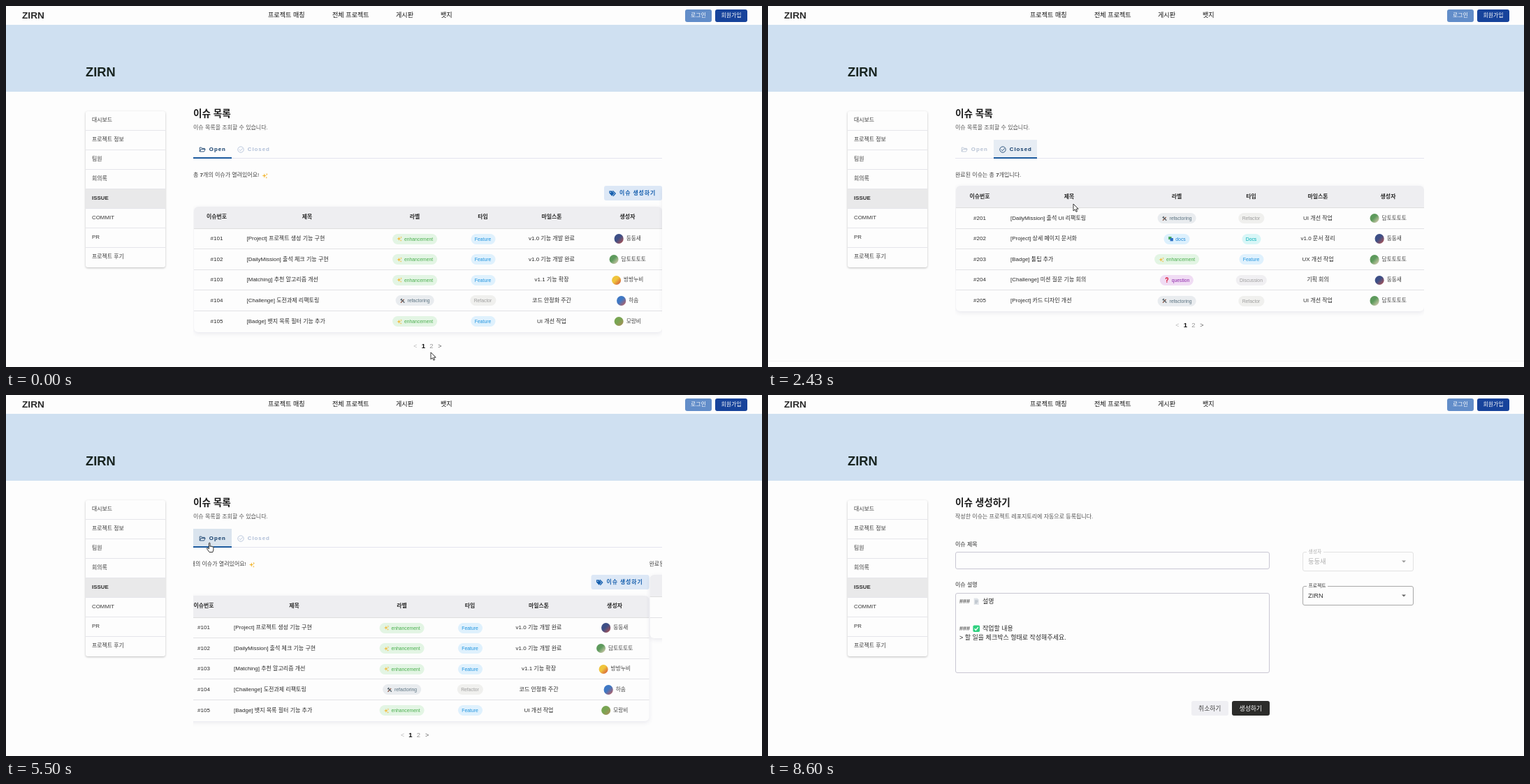
An HTML page that plays this animation: 1082x518 px, repeating every 8.63 s.

```html
<!DOCTYPE html>
<html lang="ko">
<head>
<meta charset="utf-8">
<title>이슈 목록</title>
<style>
html, body { margin: 0; width: 100%; height: 100%; overflow: hidden; background: #fdfdfd; }
body { position: relative; color: #2b2b2b; font: 8px 'Liberation Sans', 'Noto Sans CJK KR', 'Noto Sans CJK', sans-serif; }
div, span.t { position: absolute; box-sizing: border-box; }
.layer { inset: 0; }
.t { line-height: 20px; margin-top: -10px; white-space: pre; }
.c { transform: translateX(-50%); }
.row { display: flex; align-items: center; }
svg { display: block; flex: none; overflow: visible; }
b { font-weight: 700; }
.pill { height: 15px; border-radius: 8px; padding: 0 5.8px; gap: 3px; font-size: 6.8px; line-height: 15px; margin-top: -7.5px; }
.face { position: static; width: 13.5px; height: 13.5px; border-radius: 50%; margin-right: 4px; flex: none; }
#views { clip-path: inset(0 143px 0 268px); }
</style>
</head>
<body>
<script>
const LOOP = 8630, WIDTH = 671;
const APP = 'ZIRN', ME = '둥둥새';

// ---- markup helpers ----
const text = (x, y, s, css = '', cls = '') =>
  `<span class="t ${cls}" style="left:${x}px;top:${y}px;${css}">${s}</span>`;
const mid = (x, y, s, css) => text(x, y, s, css, 'c');
const box = (x, y, w, h, css = '', inner = '') =>
  `<div style="left:${x}px;top:${y}px;width:${w}px;height:${h}px;${css}">${inner}</div>`;
const layer = (id, inner) => `<div class="layer" id="${id}">${inner}</div>`;
const svg = (size, inner, attrs = '') =>
  `<svg width="${size}" height="${size}" viewBox="0 0 24 24" ${attrs}>${inner}</svg>`;
const at = (x, y, inner) => `<div style="left:${x}px;top:${y}px">${inner}</div>`;
const path = (d, fill) => `<path d="${d}" fill="${fill}"/>`;
const line = (d, color, w = 2) => `<path d="${d}" fill="none" stroke="${color}" stroke-width="${w}"/>`;

const ICON = {
  spark: path('M10 3l2 7 7 2-7 2-2 7-2-7-7-2 7-2z', '#f2b632') + path('M19 1l1 4 4 1-4 1-1 4-1-4-4-1 4-1zM18 16l1 2 3 1-3 1-1 3-1-3-3-1 3-1z', '#f2b632'),
  tools: line('M4 20L18 6', '#8a5a4a', 4) + line('M5 5l15 15M3 9l6-6', '#59656d', 4),
  bug: line('M4 7q5-3 7 4t9 6', '#4f9f45', 8) + line('M6 12l-2 5M13 18l-3 4M17 9l3-4', '#4f9f45'),
  docs: path('M2 3h13v12H2z', '#43a85a') + path('M9 9h13v13H9z', '#2b6fc4'),
  ask: line('M7 8q0-5 5-5t5 5q0 3-5 6v3M12 19v4', '#dc2440', 4),
  page: path('M4 1h11l5 5v17H4z', '#dfe3e8') + line('M7 9h10M7 13h10M7 17h7', '#9aa4ae', 1.6),
  done: '<rect x="1" y="1" width="22" height="22" rx="4" fill="#2fd07f"/>' + line('M6 12l4 5 8-10', '#fff', 3),
  folder: line('M3 19V5h6l2 3h9v3M3 19l4-8h15l-4 8z', 'currentColor'),
  check: '<circle cx="12" cy="12" r="10" fill="none" stroke="currentColor" stroke-width="2"/>' + line('M7 12l4 4 7-8', 'currentColor'),
  tag: path('M1 3h9l8 9-8 9-9-10z', '#155fae') + line('M13 3l9 9-8 9', '#155fae', 3) + '<circle cx="5.500" cy="7.500" r="1.800" fill="#dde8f6"/>',
  pin: path('M12 2C8 2 5 5 5 9c0 5 7 13 7 13s7-8 7-13c0-4-3-7-7-7z', '#8b9bb0') + '<circle cx="12" cy="9" r="2.500" fill="#fdfdfd"/>',
  phone: path('M4 3h5l1 5-3 3q2 4 6 6l3-3 5 1v5q0 1-1 1C10 21 3 14 3 4q0-1 1-1z', '#8b9bb0'),
  mail: path('M2 4h20v16H2z', '#8b9bb0') + line('M3 7l9 6 9-6', '#fdfdfd')
};

// ---- table data ----
const LABEL = {
  enhancement: ['spark', '#e3f5e4', '#4caf50'],
  refactoring: ['tools', '#e9ecef', '#5b7280'],
  bug: ['bug', '#f2d8e1', '#b0194a'],
  docs: ['docs', '#dcf0fd', '#1c87d6'],
  question: ['ask', '#f0dcf4', '#8e24aa']
};
const TYPE = {
  Feature: ['#dff1fd', '#2094df'], Refactor: ['#f0f0ee', '#9e9e9e'], Bug: ['#fbe3e3', '#e53935'],
  Docs: ['#d8f6f7', '#00adb5'], Discussion: ['#f0eff2', '#9e9e9e']
};
const FACE = {
  [ME]: ['#3d4f86', '#c0544c'], 담토토토토: ['#5d9a5c', '#e8d3bd'], 방방누비: ['#f0c53c', '#d0483c'],
  하솜: ['#3f78c4', '#cf5a50'], 모랑비: ['#78a552', '#b08a5a'], Dewfern: ['#ecc04a', '#a8623c']
};
const SUKI = '담토토토토';

const pill = (x, y, [bg, fg], inner) =>
  `<div class="pill row c" style="left:${x}px;top:${y}px;background:${bg};color:${fg}">${inner}</div>`;

function cells([id, title, label, type, goal, user], y, [cId, , xTitle, cLabel, cType, cGoal, cUser]) {
  const [icon, ...tone] = LABEL[label], [a, b] = FACE[user];
  return mid(cId, y, id) + text(xTitle, y, title) +
    pill(cLabel, y, tone, svg(8, ICON[icon]) + label) + pill(cType, y, TYPE[type], type) + mid(cGoal, y, goal) +
    `<span class="t c row" style="left:${cUser}px;top:${y}px;font-size:7.7px;color:#444"><div class="face" style="background:linear-gradient(135deg,${a} 45%,${b})"></div>${user}</span>`;
}

function issuePage(id, top, cols, current, rows) {
  const head = ['이슈번호', '제목', '', '라벨', '타입', '마일스톤', '생성자'];
  const rowY = i => top + 32 + 29.6 * i, end = rowY(rows.length);
  const num = n => mid(n === 1 ? 597.5 : 609, end + 20, n,
    `font-size:9.5px;${n === current ? 'font-weight:700;color:#111' : 'color:#999'}`);
  const arrow = (x, s, on) => mid(x, end + 20, s, `font-size:9px;color:${on ? '#666' : '#bbb'}`);
  return layer(id,
    box(268.5, top, 670.5, end - top, 'border-radius:6px;box-shadow:0 2px 6px rgba(60,60,110,.11);background:#fdfdfd') +
    box(268.5, top, 670.5, 32, 'border-radius:6px 6px 0 0;background:#eeeef1;border-bottom:1px solid #dedede') +
    head.map((s, i) => mid(cols[i], top + 15.5, s, 'font-weight:700;font-size:7.9px')).join('') +
    rows.map((r, i) => (i ? box(268.5, rowY(i) - 1, 670.5, 1, 'background:#e2e2e5') : '') + cells(r, rowY(i) + 14.6, cols)).join('') +
    arrow(586, '&lt;', current === 2) + num(1) + num(2) + arrow(621, '&gt;', current === 1));
}

const openPane = layer('open',
  text(268, 243, '총 <b>7</b>개의 이슈가 열려있어요!', 'color:#444') + at(365.5, 238.5, svg(9, ICON.spark)) +
  box(855.5, 258, 83.5, 20.5, 'background:#dde8f6;border-radius:3px') + at(863, 263.5, svg(10, ICON.tag)) +
  text(878, 268.5, '이슈 생성하기', 'font-weight:700;color:#155fae;letter-spacing:.9px;font-size:7.9px') +
  issuePage('o1', 287.5, [301.5, 431, 344.5, 585, 682.5, 781, 889.5], 1, [
    ['#101', '[Project] 프로젝트 생성 기능 구현', 'enhancement', 'Feature', 'v1.0 기능 개발 완료', ME],
    ['#102', '[DailyMission] 출석 체크 기능 구현', 'enhancement', 'Feature', 'v1.0 기능 개발 완료', SUKI],
    ['#103', '[Matching] 추천 알고리즘 개선', 'enhancement', 'Feature', 'v1.1 기능 확장', '방방누비'],
    ['#104', '[Challenge] 도전과제 리팩토링', 'refactoring', 'Refactor', '코드 안정화 주간', '하솜'],
    ['#105', '[Badge] 뱃지 목록 필터 기능 추가', 'enhancement', 'Feature', 'UI 개선 작업', '모랑비']]) +
  issuePage('o2', 287.5, [301, 448, 343.5, 619.5, 713.5, 802, 896], 2, [
    ['#106', '[Project] 삭제 기능 오류 수정', 'bug', 'Bug', '긴급 패치 v1.0.1', 'Dewfern'],
    ['#107', '[Matching] 사용자 매칭 결과 저장 기능 구현', 'enhancement', 'Feature', 'v1.1 기능 확장', ME]]));

const closedTwin = ['#206', '[Matching] 매칭 로직 구조 분리', 'refactoring', 'Refactor', '코드 안정화 주간', ME];
const closedPane = layer('closed',
  text(268, 243, '완료된 이슈는 총 <b>7</b>개입니다.', 'color:#444') +
  issuePage('c1', 258, [303, 431, 347, 585, 691.5, 787, 887.5], 1, [
    ['#201', '[DailyMission] 출석 UI 리팩토링', 'refactoring', 'Refactor', 'UI 개선 작업', SUKI],
    ['#202', '[Project] 상세 페이지 문서화', 'docs', 'Docs', 'v1.0 문서 정리', ME],
    ['#203', '[Badge] 툴팁 추가', 'enhancement', 'Feature', 'UX 개선 작업', SUKI],
    ['#204', '[Challenge] 미션 질문 기능 회의', 'question', 'Discussion', '기획 회의', ME],
    ['#205', '[Project] 카드 디자인 개선', 'refactoring', 'Refactor', 'UI 개선 작업', SUKI]]) +
  issuePage('c2', 258, [305.5, 438.5, 351.5, 592, 692, 793.5, 895], 2, [closedTwin, closedTwin]));

// ---- page frame ----
const heading = (title, sub) => text(268, 154.5, title, 'font-size:13.6px;font-weight:700;color:#1c1c1c') +
  text(268, 174.5, sub, 'color:#555');
const button = (x, y, w, h, s, bg, fg, size) =>
  box(x, y, w, h, `background:${bg};border-radius:3px`) + mid(x + w / 2, y + h / 2, s, `color:${fg};font-size:${size}px;font-weight:500`);

const menu = ['대시보드', '프로젝트 정보', '팀원', '회의록', 'ISSUE', 'COMMIT', 'PR', '프로젝트 후기'];
const frame =
  box(0, 27, 1082, 95.5, 'background:#cfe0f1') +
  text(23, 13.5, APP, 'font-size:13.7px;font-weight:700') +
  text(114, 95, APP, 'font-size:18.3px;font-weight:700;color:#182420') +
  [[375, '프로젝트 매칭'], [467, '전체 프로젝트'], [558, '게시판'], [622, '뱃지']]
    .map(([x, s]) => text(x, 13, s, 'font-size:9.1px;color:#111;font-weight:500')).join('') +
  button(972, 4.5, 38, 18, '로그인', '#628dc9', '#fff;font-weight:700', 7.9) +
  button(1015, 4.5, 46, 18, '회원가입', '#17439b', '#fff;font-weight:700', 7.9) +
  box(113.5, 150.5, 114, 224, 'border-radius:3px;box-shadow:0 1px 3px rgba(0,0,0,.25);background:#fdfdfd') +
  menu.map((s, i) => box(113.5, 150.5 + 28 * i, 114, 28,
      `border-bottom:${i < 7 ? 1 : 0}px solid #e5e5ea;${s === 'ISSUE' ? 'background:#e9e9ea' : ''}`) +
    text(123, 164.2 + 28 * i, s, `font-size:7.9px;${s === 'ISSUE' ? 'font-weight:700' : 'color:#3a3a3a'}`)).join('');

const tab = (id, x, w, icon, s) => box(x, 192, w, 26.5, 'overflow:hidden',
    `<div id="${id}Wave" style="border-radius:50%;background:#15569c"></div>`) +
  `<div id="${id}Tab" class="layer">` + at(x + 7.5, 200.5, svg(10, ICON[icon])) +
  text(x + 22.8, 205.5, s, 'font-weight:700;font-size:7.9px;letter-spacing:.95px') + '</div>';

const list = layer('list', heading('이슈 목록', '이슈 목록을 조회할 수 있습니다.') +
  box(268, 218, WIDTH, 1, 'background:#e4e4ef') +
  tab('open', 268, 55, 'folder', 'Open') + tab('closed', 323, 62, 'check', 'Closed') +
  '<div id="bar" style="top:217.3px;height:1.300px;background:#1c5a9e"></div>' +
  layer('views', openPane + closedPane));

const links = [
  [38, '프로젝트 매칭', '#a9c8e4', '랜덤 매칭', '사설 매칭', '방 생성'],
  [293.5, '전체 프로젝트', '#75a0cd', '전체 프로젝트'],
  [464, '게시판', '#75a0cd', '자유게시판', 'Q&amp;A 게시판', '모집게시판'],
  [719, '뱃지', '#a9c8e4', '전체', '도전과제', '현업'],
  [889, 'Contacts', '#7d9cc0', '24, Narubit-ro, Solgaram-gu, Haeon', '+82 10 0000 0000', 'hellofield00@example.com']];
const footer = layer('footer', box(0, 0, 1082, 1, 'background:#f1f1f3') +
  links.map(([x, title, color, ...items], i) =>
    text(x, 34.5, title, 'font-size:10.2px;font-weight:700;color:#6f9fd0') +
    items.map((s, k) => (i === 4 ? at(x, 54 + 17 * k, svg(8, ICON[['pin', 'phone', 'mail'][k]])) : '') +
      text(i === 4 ? 903 : x, 58.5 + 17 * k, s, `color:${color}`)).join('')).join(''));

const select = (y, label, value, tone, edge) =>
  box(764.5, y, 159.5, 27.5, `border:1px solid ${edge};border-radius:3px`) +
  text(771, y, label, `font-size:6.8px;line-height:8px;margin-top:-4px;padding:0 2.500px;background:#fdfdfd;color:${tone}`) +
  text(773, y + 13.5, value, `font-size:9.3px;color:${tone}`) +
  at(904, y + 8, svg(12, path('M6 9l6 6 6-6z', tone === '#333' ? '#666' : '#999')));
const field = (y, h) => box(268, y, 450, h, 'border:1px solid #c9c7d3;border-radius:3px');
const form = layer('form', heading('이슈 생성하기', '작성한 이슈는 프로젝트 레포지토리에 자동으로 등록됩니다.') +
  text(268, 214.5, '이슈 제목') + field(225, 25) + text(268, 273, '이슈 설명') + field(284, 114.5) +
  [[296, '###'], [335, '###'], [348, '&gt; 할 일을 체크박스 형태로 작성해주세요.']]
    .map(([y, s]) => text(274, y, s, 'font-size:9px')).join('') +
  at(293, 290.500, svg(10.5, ICON.page)) + text(307, 296, '설명', 'font-size:9px') +
  at(293, 329.800, svg(10.5, ICON.done)) + text(307, 335, '작업할 내용', 'font-size:9px') +
  button(605.5, 439, 53.5, 21, '취소하기', '#efeff3', '#444', 8.8) +
  button(663.5, 439, 54.5, 21, '생성하기', '#2c2c2a', '#fff', 8.8) +
  select(225, '생성자', ME, '#b0b0b0', '#e2e2e2') + select(274, '프로젝트', APP, '#333', '#a8a8a8'));

const cursor = `<div id="mouse" style="left:0;top:0"><svg width="1" height="1" fill="#fff" stroke="#222" stroke-width=".9" stroke-linejoin="round">
  <path id="arrow" d="M0 0V10L2.400 7.800 4 11.300 5.600 10.600 4.100 7.200H7.200z"/>
  <path id="hand" transform="translate(-4 -.5)" d="M4 14L.8 9.500c-1-1.500.6-2.200 1.500-1.100L3.400 9.500V1.600c0-1.500 1.700-1.500 1.700 0V6c0-1 1.700-1 1.700.2.1-.9 1.600-.7 1.600.4.1-.8 1.500-.6 1.500.4V10.500L8.900 14z"/></svg></div>`;
document.body.innerHTML += frame + footer + list + form + cursor;

// ---- motion ----
const el = id => document.getElementById(id);
const show = (id, on) => { el(id).style.display = on ? '' : 'none'; };
const clamp = v => Math.max(0, Math.min(1, v));
const bezier = (x1, y1, x2, y2) => x => {
  const curve = (a, b, s) => 3 * (1 - s) ** 2 * s * a + 3 * (1 - s) * s * s * b + s ** 3;
  let lo = 0, hi = 1;
  for (let i = 0; i < 24; i++) {
    const s = (lo + hi) / 2;
    if (curve(x1, x2, s) < x) lo = s; else hi = s;
  }
  return curve(y1, y2, lo);
};
const swipe = bezier(.15, .3, .25, 1), smooth = bezier(.4, 0, .2, 1);

const PAGE_OPEN = 1000, TO_CLOSED = 1950, PAGE_CLOSED = 3250, TO_OPEN = 5235, CREATE = 6450;
const route = [[0, 608, 497], [350, 608, 497], [700, 609, 487], [1200, 609, 487], [1780, 367, 203], [2080, 367, 203],
  [2430, 437, 284], [3000, 610, 457], [3500, 611, 458], [4300, 611, 458], [5000, 291, 212], [5580, 291, 212],
  [6150, 895, 268], [6550, 895, 268], [6900, 920, 273], [7350, 920, 273], [7800, 930, -20], [LOOP, 930, -20]];
const pressable = [[600, PAGE_OPEN], [1700, 2150], [2900, PAGE_CLOSED], [4930, 5660], [6080, CREATE]];

// Share of the way from the Open tab to the Closed tab
const shift = (t, ease, ms) => ease(clamp((t - TO_CLOSED) / ms)) - ease(clamp((t - TO_OPEN) / ms));

function wave(id, t, start, x, y) {
  const r = 66 * smooth(clamp((t - start) / 550));
  const alpha = t < start ? 0 : .15 * (1 - clamp((t - start - 460) / 550));
  Object.assign(el(id).style, { left: x - r + 'px', top: y - r + 'px', width: 2 * r + 'px', height: 2 * r + 'px', opacity: alpha });
}

function draw(t) {
  const closed = t >= TO_CLOSED && t < TO_OPEN, creating = t >= CREATE;
  const openSecond = t >= PAGE_OPEN && t < TO_OPEN, closedSecond = t >= PAGE_CLOSED;
  show('list', !creating);
  show('form', creating);
  show('o1', !openSecond);
  show('o2', openSecond);
  show('c1', !closedSecond);
  show('c2', closedSecond);

  const slide = shift(t, swipe, 350) * WIDTH;
  el('open').style.transform = `translateX(${-slide}px)`;
  el('closed').style.transform = `translateX(${WIDTH - slide}px)`;
  const k = shift(t, smooth, 300);
  el('bar').style.left = 268 + 55 * k + 'px';
  el('bar').style.width = 55 + 7 * k + 'px';
  el('openTab').style.color = closed ? '#b6c1d3' : '#0f3a68';
  el('closedTab').style.color = closed ? '#0f3a68' : '#b0bfd8';
  wave('closedWave', t, 1770, 44, 14);
  wave('openWave', t, 5130, 23, 20);

  const foot = creating ? 560 : closed ? (closedSecond ? 420 : 509) : openSecond ? 449 : 539;
  el('footer').style.transform = `translateY(${foot}px)`;

  const i = route.findIndex(p => p[0] > t), [t0, x0, y0] = route[i - 1], [t1, x1, y1] = route[i];
  const u = (t - t0) / (t1 - t0), e = u * u * (3 - 2 * u);
  el('mouse').style.transform = `translate(${x0 + (x1 - x0) * e}px,${y0 + (y1 - y0) * e}px)`;
  const hand = pressable.some(([a, b]) => t >= a && t < b);
  show('hand', hand);
  show('arrow', !hand);
}

const begin = performance.now();
function tick() {
  draw((performance.now() - begin) % LOOP);
  requestAnimationFrame(tick);
}
tick();
</script>
</body>
</html>
```
